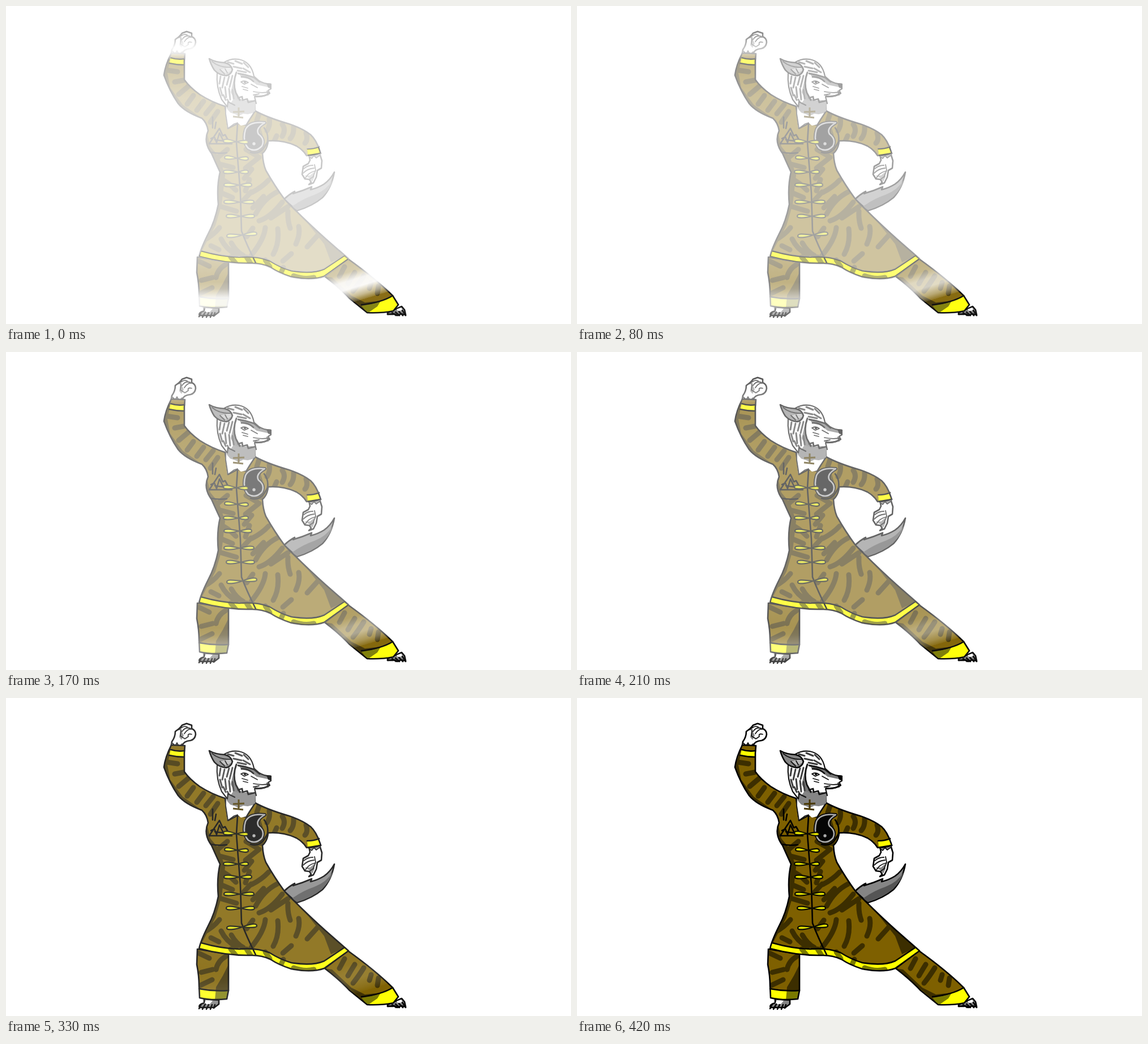
An HTML page for the animation above (0.87 s loop, 998x561 px).

```html
<!DOCTYPE html>
<html lang="en">
<head>
<meta charset="utf-8">
<title>Fighter fade-in</title>
<style>
html, body { margin: 0; width: 100%; height: 100%; overflow: hidden; background: #fff; }
svg { display: block; width: 100%; height: 100%; }
.ink { stroke: #000; stroke-width: 2.6; stroke-linejoin: round; stroke-linecap: round; }
.line { fill: none; stroke: #111; stroke-width: 1.8; stroke-linejoin: round; stroke-linecap: round; }
.bold { fill: none; stroke: #111; stroke-width: 2.8; stroke-linejoin: round; stroke-linecap: round; }
.hair { fill: none; stroke: #3c3c3c; stroke-width: 3; stroke-linecap: round; }
.stripe { fill: none; stroke: #000; stroke-width: 9; stroke-linecap: round; stroke-linejoin: round; }
.knot { fill: #dede00; stroke: #0a0a00; stroke-width: 2.2; stroke-linejoin: round; }
.brown { fill: #7e6000; }
.yellow { fill: #ff0; }
.white { fill: #fff; }
.grey { fill: #858585; }
</style>
</head>
<body>
<svg viewBox="0 0 998 561">
<defs>
  <path id="coat" d="M292 83L316 84L315 97L315 130Q324 143 342 156Q362 169 387 177L392 216L409 207L424 210L440 185Q462 197 500 208Q524 216 538 227Q549 237 556 260L531 264Q525 254 513 247Q490 236 463 238Q462 252 453 260Q454 278 459 290Q475 318 492 341Q530 380 565 411L605 446L562 477Q540 485 504 478Q482 471 467 461Q452 454 435 454Q390 455 341 442Q344 428 357 402Q369 380 375 350Q372 318 378 293Q371 278 363 260Q348 240 357 220Q355 206 346 198Q316 187 304 172Q289 150 279 122Q281 105 292 83Z"/>
  <path id="hem" d="M345 432Q380 442 412 443Q441 440 465 449Q484 461 504 467Q541 473 562 464L598 440L605 447L562 477Q540 485 504 478Q482 471 467 461Q452 454 435 454Q390 455 341 442Z"/>
  <path id="cuffs" d="M291 91Q303 95 315 93L314 104Q301 104 288 101ZM532 252Q544 252 553 248L556 260Q544 264 533 264Z"/>
  <path id="legL" d="M338 443L337 470Q341 490 341 508L342 529Q364 534 390 531L393 516V452Z"/>
  <path id="legR" d="M563 477Q588 496 607 516L638 541Q664 542 684 538L693 527L683 511Q654 482 604 446Z"/>
  <path id="head" d="M442 172L439 160Q455 161 466 154L463 149L468 146L467 138Q455 137 447 132L438 124Q433 98 411 94Q397 92 386 99L373 118Q371 143 381 165L391 178L392 169L404 175"/>
  <path id="drop" d="M457 206Q430 203 423 218Q417 239 428 251Q441 259 452 247Q458 235 446 226Q440 216 457 206Z"/>
  <clipPath id="inCoat"><use href="#coat"/></clipPath>
  <clipPath id="inLegs"><use href="#legL"/><use href="#legR"/></clipPath>
  <clipPath id="inHead"><use href="#head"/></clipPath>
  <linearGradient id="armFog" gradientUnits="userSpaceOnUse" x1="0" y1="44" x2="0" y2="190">
    <stop offset="0" stop-color="#a6a6a6"/><stop offset=".11" stop-color="#ccc"/>
    <stop offset=".2" stop-color="#f7f7f7"/><stop offset=".27" stop-color="#e8e8e8"/>
    <stop offset=".35" stop-color="#aaa"/><stop offset=".5" stop-color="#b0b0b0"/>
    <stop offset=".8" stop-color="#c4c4c4"/><stop offset="1" stop-color="#c8c8c8"/>
  </linearGradient>
  <linearGradient id="legFogL" gradientUnits="userSpaceOnUse" x1="0" y1="445" x2="0" y2="549">
    <stop offset="0" stop-color="#b8b8b8"/><stop offset=".4" stop-color="#a4a4a4"/>
    <stop offset=".52" stop-color="#b4b4b4"/><stop offset=".67" stop-color="#f0f0f0"/>
    <stop offset=".8" stop-color="#f0f0f0"/><stop offset=".87" stop-color="#a0a0a0"/>
    <stop offset="1" stop-color="#777"/>
  </linearGradient>
  <linearGradient id="legFogR" gradientUnits="userSpaceOnUse" x1="590" y1="450" x2="612" y2="523">
    <stop offset="0" stop-color="#a4a4a4"/><stop offset=".3" stop-color="#b0b0b0"/>
    <stop offset=".5" stop-color="#f2f2f2"/><stop offset=".68" stop-color="#f7f7f7"/>
    <stop offset=".88" stop-color="#909090"/><stop offset="1" stop-color="#303030"/>
    <stop offset="1" stop-color="#161616"/>
  </linearGradient>
  <mask id="fog" maskUnits="userSpaceOnUse" x="0" y="0" width="998" height="561">
    <rect width="998" height="561" fill="#c8c8c8"/>
    <rect x="330" y="440" width="70" height="115" fill="url(#legFogL)"/>
    <path d="M555 430H715V555H555Z" fill="url(#legFogR)"/>
    <use href="#coat" fill="#c8c8c8" stroke="#c8c8c8" stroke-width="2"/>
    <rect x="272" y="38" width="72" height="152" fill="url(#armFog)"/>
    <use href="#hem" fill="#909090"/>
    <use href="#cuffs" fill="#909090"/>
  </mask>
</defs>

<g id="tail">
  <path class="grey ink" d="M580 293Q573 306 562 314Q551 321 538 324L540 319Q524 326 507 331L510 327Q499 333 491 341L514 361Q541 353 559 338Q575 321 580 293Z"/>
  <path fill="#555" d="M577 307Q566 325 545 333Q522 341 505 354L514 360Q541 352 558 337Q573 323 577 307Z"/>
</g>

<g id="feet">
  <path class="grey ink" d="M350 531L376 533V540L368 546H342Q339 541 350 538Z"/>
  <path class="white" d="M353 533L365 534L360 540H350Z"/>
  <path class="ink" fill="none" d="M345 540L341 548M352 540L347 549M358 541L354 549M364 541L361 549M369 541L367 547"/>
  <path class="grey ink" d="M674 541L699 530L704 536L706 545L698 543L692 546L686 543L674 544Z"/>
  <path class="white" d="M690 535L698 532L700 536L693 539Z"/>
  <path class="ink" fill="none" d="M674 544H684M682 541L689 546M688 540L695 546M694 539L701 546M700 537L706 546"/>
</g>

<g id="legs">
  <use href="#legL" class="brown"/>
  <use href="#legR" class="brown"/>
  <path class="yellow" d="M341 513Q367 518 393 516L390 531Q364 534 342 529ZM628 529Q664 524 683 510L693 527L684 538Q664 542 638 541Z"/>
  <g clip-path="url(#inLegs)" opacity=".52">
    <path class="stripe" d="M340 450L359 459M345 484L365 479M341 508L364 497M388 456Q374 464 371 479M598 460L589 477M616 470Q608 483 604 490M632 476Q622 492 613 503M645 488L642 498M658 494L656 507"/>
    <path d="M393 470L383 490L371 510L369 533H395ZM563 477L576 479L610 511L634 523L662 520L656 530L640 541Z"/>
  </g>
  <path class="ink" fill="none" d="M341 513Q367 518 393 516M628 527Q664 523 683 511"/>
  <use href="#legL" class="ink" fill="none"/>
  <use href="#legR" class="ink" fill="none"/>
</g>

<g id="hands">
  <path class="white ink" d="M291 89L293 77Q299 69 299 59Q307 54 311 48L319 45L328 48L328 54Q335 57 335 64Q334 73 326 75Q314 76 312 83L311 93Z"/>
  <path class="grey" d="M293 78L299 83L302 79L306 86L311 81V92L292 89ZM309 56L314 66L310 74L306 69Z"/>
  <path class="line" d="M293 79L299 84L302 79L306 86L311 81M306 56Q313 48 320 51M311 59Q317 50 326 54M315 63Q321 54 327 55M309 56L308 67L316 72L322 68Q320 62 328 64"/>
  <path class="white ink" d="M535 262L537 272L534 278L525 283L523 297L528 305L536 306L539 311L535 315L543 312L548 302L550 290L557 286L558 273L554 260Z"/>
  <path class="grey" d="M535 262L540 268L544 264L548 268L555 263V259ZM527 299L535 303L541 310L545 301L544 293L537 299Z"/>
  <path class="line" d="M535 265L540 269L544 264L548 268L555 263M526 287Q533 281 542 281M525 295Q532 287 544 286M529 303Q534 294 546 291M545 280L547 290L542 302M537 305L543 301"/>
</g>

<g id="robe">
  <use href="#coat" class="brown"/>
  <use href="#hem" class="yellow"/>
  <use href="#cuffs" class="yellow"/>
  <g clip-path="url(#inCoat)" opacity=".52">
    <path class="stripe" d="M283 113L303 116M298 134L314 131M305 156L324 140M320 173L331 158M337 184L349 168M353 190L366 174M361 205L374 186"/>
    <path class="stripe" d="M447 190L443 202M465 199Q467 211 461 220M488 209Q495 218 488 230M508 213Q509 226 502 234M530 224Q534 236 528 242M445 215L449 228M478 229L474 238"/>
    <path class="stripe" d="M378 279L401 285M373 268L391 253M379 305Q393 311 406 325M381 330L400 338M380 354L407 362M424 253L443 264M423 286L447 267M421 304L434 288M423 326L430 306M420 342L433 328"/>
    <path class="stripe" d="M434 329Q452 320 464 307M436 356L455 336M441 367Q455 340 479 328M447 379Q467 373 488 346M468 374L498 354M436 392L425 407M458 391Q456 412 433 440M480 393Q483 419 472 438M498 362Q497 378 502 392M517 389Q520 403 512 420M551 404L532 425M504 437L489 450"/>
    <path class="stripe" d="M377 391Q366 405 348 414M362 423L376 430M380 411Q388 428 407 439M398 418Q407 434 419 440M397 443L406 454M425 443L432 454M458 448L466 460M490 461L486 470M508 476Q526 483 544 479"/>
    <path d="M292 83L279 122L302 176L346 198L312 174L290 144L285 118ZM354 219L361 248L376 266L387 298L381 350L370 387L346 432H340L373 350L376 293L350 240ZM452 261L433 259L451 250L463 239ZM496 345L535 386L562 420L574 452L600 440L604 445Z"/>
  </g>
  <path class="ink" fill="none" d="M345 432Q380 442 412 443Q441 440 465 449Q484 461 504 467Q541 473 562 464L598 440M291 91Q303 95 315 93M288 101Q301 104 314 104M532 252Q544 252 553 248M533 264Q544 264 556 260"/>
  <use href="#coat" class="ink" fill="none"/>
  <path class="ink" fill="none" d="M409 208L407 240Q409 268 411 292L414 330L416 397Q425 421 441 453M362 258Q375 261 390 259M432 258Q451 264 462 239Q464 225 456 215"/>
  <path class="ink" fill="none" d="M365 196V215M371 205L369 216M377 216L359 243H399M377 216L383 229L387 227L392 236M362 234L368 231L372 241L377 224L384 238L369 236"/>
  <use href="#drop" class="ink" style="stroke-width:6"/>
  <use href="#drop" fill="#050505" stroke="#aaa" stroke-width="2.6" stroke-linejoin="round"/>
  <circle cx="438" cy="243" r="2.7" fill="#aaa"/>
  <g id="knots"></g>
</g>

<g id="neck">
  <path class="white" d="M388 172L387 186L391 216L409 206L415 211L424 209L432 198L440 181V168Z"/>
  <path class="grey" d="M389 168L390 181L396 188L405 191L411 194L419 190L427 191L439 188L441 168Z"/>
  <path class="line" d="M388 177V190L392 216L403 208L409 206M424 210L430 200L440 185V171"/>
</g>

<g id="face">
  <use href="#head" class="white"/>
  <g clip-path="url(#inHead)">
    <path fill="#777" d="M405 117Q402 145 409 160L419 167L434 166L443 168V181H401L406 171L397 152ZM410 118Q428 121 439 125L449 134L468 139L467 144L443 139L430 129L416 126Z"/>
    <path class="hair" d="M392 99L402 102M405 97L417 102M420 100L428 108M402 107L416 110M419 110L431 117M409 114L424 117M379 124L377 137M386 126L382 144M394 124L390 139M400 123L395 143M378 144L382 158M387 143L389 161M394 146L396 165M400 148L403 169M384 157L388 166M391 165L396 174"/>
  </g>
  <path class="grey" d="M402 164L413 168L441 167L440 186L419 190L403 188L390 181Z"/>
  <path class="bold" d="M407 117Q400 136 406 153L413 166M410 162L417 160L418 166L426 164L428 170L440 167"/>
  <use href="#head" class="bold" style="stroke-width:2.2"/>
  <path class="grey ink" d="M359 93Q369 99 386 100Q397 102 400 112Q398 121 389 123Q376 122 368 113Q362 104 359 93Z"/>
  <path fill="#bbb" d="M378 112L396 108L398 114L389 119Z"/>
  <path class="line" d="M364 98Q377 109 397 108M378 112L386 120M387 111L391 118"/>
  <path class="bold" d="M410 119Q424 121 438 126L448 134M416 125Q427 124 437 133M462 138H467V144M440 159Q455 161 465 154"/>
  <path class="line" d="M415 134Q421 130 428 135L421 138ZM417 142L427 145M419 147L427 149M433 138L444 144M437 151Q449 154 465 152M437 157L447 155M461 150L463 157"/>
  <circle cx="422" cy="134.500" r="2"/>
  <path d="M460 136L469 137L469 146L463 144Z"/>
  <path fill="none" stroke="#493700" stroke-width="3" d="M411 179V196M401 187L421 186M401 195L419 197"/>
</g>

<rect id="veil" width="998" height="561" fill="#fff" mask="url(#fog)"/>
</svg>
<script>
const loop = 870;
const steps = [0, 40, 80, 130, 170, 210, 250, 290, 330, 380, 420];
const veil = document.getElementById("veil");

// Each fastening: left end, centre, right end, height, tilt
function knot(l, c, r, y, tilt = 0) {
  const lobe = (x, dy) =>
    `M${c} ${y}C${(c + x) / 2} ${y - 3 + dy} ${x} ${y - 6 + dy} ${x} ${y + dy}` +
    `C${x} ${y + 4 + dy} ${(c + x) / 2} ${y + 3 + dy} ${c} ${y}Z`;
  return `<path class="knot" d="${lobe(l, tilt)}${lobe(r, -tilt)}"/>`;
}
document.getElementById("knots").innerHTML = [
  knot(384, 407, 428, 239.5, -1), knot(386, 408, 428, 268.5, -1),
  knot(384, 410, 428, 293), knot(385, 412, 434, 316),
  knot(385, 413, 438, 346), knot(389, 415, 439, 371),
  knot(390, 417, 443, 404, 2)
].join("");

function draw(ms) {
  const t = ms % loop;
  const step = steps.filter(s => s <= t).length - 1;
  veil.setAttribute("opacity", 1 - step / (steps.length - 1));
}

let start;
function tick(now) {
  start ??= now;
  draw(now - start);
  requestAnimationFrame(tick);
}
draw(0);
requestAnimationFrame(tick);
</script>
</body>
</html>
```
